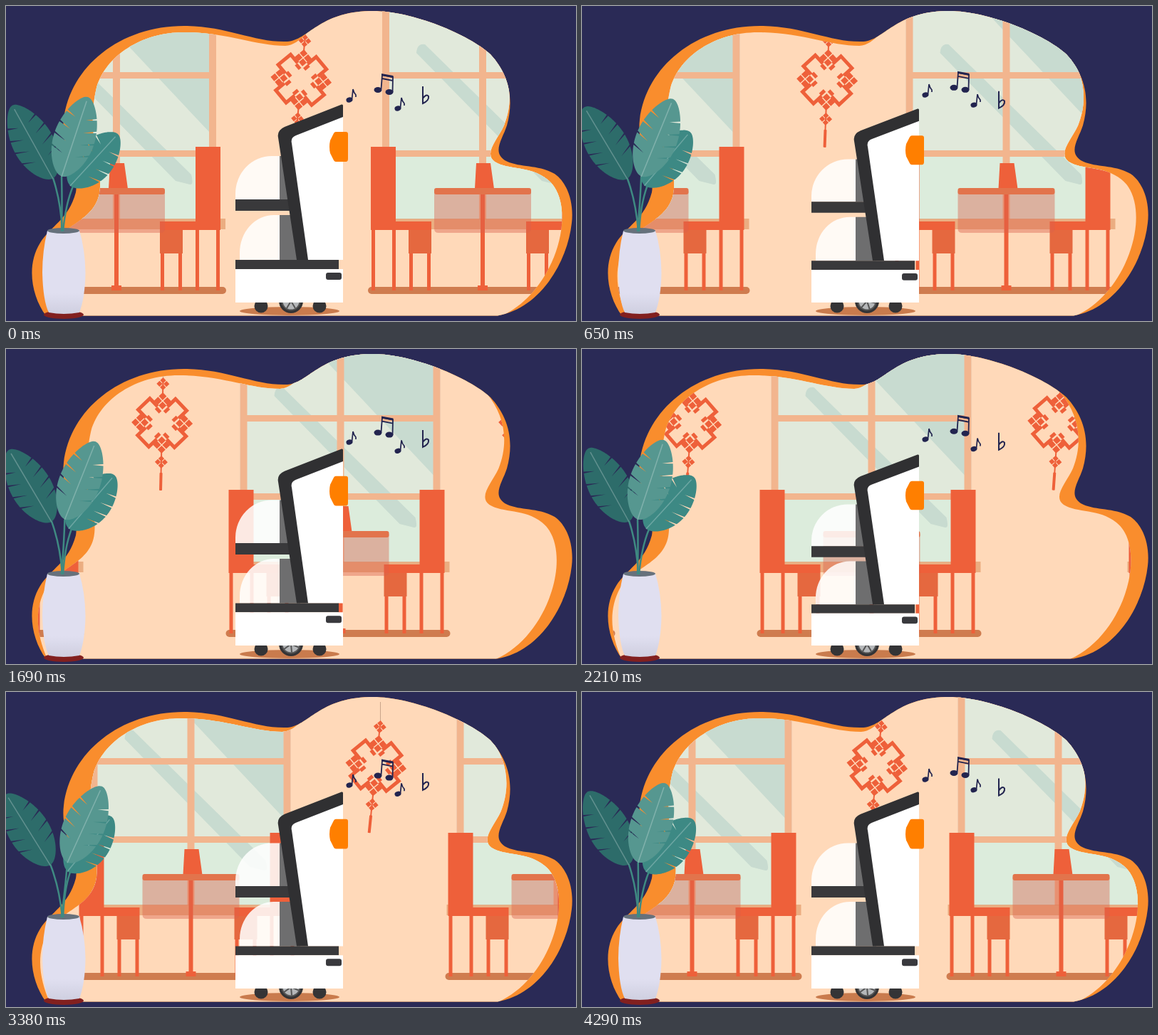
Animation of 800x443 px, one loop 4420 ms. Source, as an HTML page:

```html
<!DOCTYPE html>
<html lang="en">
<head>
<meta charset="utf-8">
<title>Serving robot</title>
<style>
  html, body { margin: 0; width: 100%; height: 100%; overflow: hidden; background: #2a2a56; }
  svg { display: block; width: 800px; height: 443px; }
</style>
</head>
<body>
<svg viewBox="0 0 800 443">
  <defs>
    <path id="outer" d="M56 435.500C36 408 28 365 48 333C62 310 88 300 98 262C103 235 76 200 81 160C90 85 160 28 250 28
      C310 28 350 52 395 50C425 48 440 7 515 7C570 7 650 40 680 68C702 92 715 125 703 168C697 187 682 205 700 217
      C720 228 745 222 770 236C790 250 797 280 794 305C788 360 750 425 690 435.500z"/>
    <clipPath id="outerClip"><use href="#outer"/></clipPath>
    <clipPath id="innerClip"><path id="inner" d="M66 437C52 405 45 370 64 335C85 305 130 300 132 255C134 215 112 180 127 115
      C140 70 190 37 250 37C310 37 350 56 392 56C425 55 440 -10 515 -8C580 -8 650 32 682 62C707 92 714 130 699 168
      C690 188 670 207 686 219C705 231 735 224 760 244C778 258 782 285 780 308C776 355 745 415 693 437z"/></clipPath>
    <linearGradient id="vase" x2="0" y2="1">
      <stop offset=".75" stop-color="#e0dff0"/><stop offset="1" stop-color="#cfcfe0"/>
    </linearGradient>

    <g id="window">
      <path fill="#e1e9db" d="M0 0H281V300H0z"/>
      <path fill="#dcecdc" d="M0 208H281V300H0z"/>
      <path fill="#c8dbd0" d="M105 0H272V178zM48 66Q49 52 60 54L246 237Q250 252 244 251L224 246z"/>
      <path fill="#f2b58e" d="M0 0h10v300h-10zM136 0h10v300h-10zM271 0h10v300h-10zM0 93h281v9H0zM0 203h281v9H0z"/>
      <path fill="#df935f" opacity=".62" d="M-14 299h308v15h-308z"/>
    </g>

    <g id="chair" fill="#ee603a">
      <path d="M0 198h35v105h50v12H0zM1 315h5v85h-5zM30 315h5v85h-5zM54 315h5v85h-5zM79 315h5v85h-5z"/>
      <path fill="#e5683f" d="M53 315h32v33h-32z"/>
    </g>
    <g id="furniture">
      <rect x="-4" y="395" width="315" height="10" rx="5" fill="#cf7c4f"/>
      <use href="#chair"/>
      <use href="#chair" transform="translate(303) scale(-1 1)"/>
      <path fill="#ee603a" d="M148 221h20l5 36h-27zM154 257h6v136h4v7h-14v-7h4z"/>
      <path fill="#d8604a" opacity=".42" d="M89 260H225V313Q225 319 219 319H95Q89 319 89 313z"/>
      <rect x="89" y="256" width="136" height="9" rx="3" fill="#e2744c"/>
    </g>

    <path id="knot" fill="#ee603a" d="M0 -12l5.5 5.5-5.5 5.5-5.5-5.5zM0 1l5.5 5.5-5.5 5.5-5.5-5.5zM-6.5 -5.5l5.5 5.5-5.5 5.5-5.5-5.5zM6.5 -5.5l5.5 5.5-5.5 5.5-5.5-5.5z"/>
    <g id="quarter">
      <use href="#knot" y="-31"/>
      <path d="M7 -23L18 -34L34 -18L23 -7M-9 -21L-3 -15M9 -21L3 -15" fill="none" stroke="#ee603a" stroke-width="5"/>
    </g>
    <g id="lantern">
      <path d="M0 0V22M0 102V134" stroke="#ee603a" stroke-width="2"/>
      <g transform="translate(0 62)">
        <use href="#quarter"/><use href="#quarter" transform="rotate(90)"/>
        <use href="#quarter" transform="rotate(180)"/><use href="#quarter" transform="rotate(270)"/>
      </g>
      <use href="#knot" transform="translate(0 7) scale(.75)"/>
      <use href="#knot" transform="translate(0 117) scale(.75)"/>
      <rect x="-2" y="132" width="4" height="25" rx="1" fill="#ee603a"/>
    </g>

    <g id="leaf">
      <path id="blade"/>
      <path d="M0 0V-112" stroke="#fff" stroke-opacity=".25" stroke-width="1.500"/>
    </g>
    <g id="note">
      <ellipse rx="4.600" ry="3.500" transform="rotate(-15)"/>
      <path d="M3.500 -1L5 -15Q6 -10 9 -7L9 -4" fill="none" stroke="#22244f" stroke-width="1.700"/>
    </g>
  </defs>

  <use href="#outer" fill="#f98d2d"/>
  <g clip-path="url(#outerClip)"><g clip-path="url(#innerClip)">
    <path fill="#ffd9b9" d="M0 0H800V443H0z"/>
    <g id="scenery">
      <use href="#window" x="14"/><use href="#window" x="528"/><use href="#window" x="1042"/>
      <use href="#furniture" x="-2"/><use href="#furniture" x="512"/><use href="#furniture" x="1030"/>
      <path d="M420 14V42M935 14V42" stroke="#c9a58a"/>
      <use class="lantern" href="#lantern" data-x="420"/>
      <use class="lantern" href="#lantern" data-x="935"/>
    </g>
  </g></g>

  <ellipse cx="398" cy="429" rx="70" ry="6" fill="#c97b4d"/>
  <g fill="#343436">
    <circle cx="358" cy="422" r="9.500"/><circle cx="440" cy="422" r="9.500"/>
    <circle cx="400" cy="415" r="17"/>
    <g id="wheel" stroke="#555" stroke-width="2"><circle r="12.500" fill="#b5b7b9"/><path d="M-12 0H12M-6 -10L6 10M6 -10L-6 10"/></g>
  </g>
  <g id="robot">
    <path fill="#fff" opacity=".86" d="M322 272V264A51 53 0 0 1 373 211H385V272zM328 357V347A48 53 0 0 1 376 294H385V357z"/>
    <path fill="#6e6e6f" d="M384 211H395L404 272H384zM384 294H402L413 357H384z"/>
    <path fill="#39393b" d="M322 272H400V288H322z"/>
    <path fill="#fff" d="M398 184L473 154V357H420z"/>
    <path fill="#303032" d="M471 138.500Q473 138 473 140V156L407 182Q399 185 401 193L424 357H408L382 185Q380 175 391 170z"/>
    <path fill="#ff7f00" d="M463 177H477Q480 177 480 180V215Q480 219 477 219H463Q461 219 460 217L455 207Q453 198 455 189L460 179Q461 177 463 177z"/>
    <path fill="#39393b" d="M322 357H467V370H322z"/>
    <path fill="#fff" d="M322 370H473V417H322z"/>
    <rect x="449" y="375" width="22" height="10" rx="3" fill="#39393d"/>
  </g>

  <g id="notes" fill="#22244f">
    <g data-rise="-10"><use href="#note" x="482" y="132"/></g>
    <g data-rise="-4.5">
      <ellipse cx="522" cy="118" rx="5.500" ry="4"/><ellipse cx="538" cy="121" rx="5.500" ry="4"/>
      <path d="M526.500 117L528 97L543 100L542.500 121M528 102L543 105" fill="none" stroke="#22244f" stroke-width="1.800"/>
      <path d="M527 95L543.500 98V101L527 98z"/>
    </g>
    <g data-rise="-7"><use href="#note" x="550" y="144"/></g>
    <g data-rise="9.5"><path d="M585 113V137Q594 133 593 127Q590 123 585 130" fill="none" stroke="#22244f" stroke-width="2"/></g>
  </g>

  <ellipse cx="81" cy="434" rx="28" ry="6" fill="#82201f"/>
  <path fill="url(#vase)" d="M58 316Q51 345 51 375Q52 415 60 431Q81 435 103 431Q111 410 111.500 375Q111 342 103 316z"/>
  <ellipse cx="80.500" cy="316" rx="22.500" ry="4" fill="#66717c"/>
  <g fill="none" stroke="#3f8a82" stroke-width="2.500">
    <g class="stalk" data-sway="-3.3"><path d="M66 242Q77 275 79 317"/><use href="#leaf" transform="translate(66 243) rotate(-29)" fill="#2d6c6a" stroke="none"/></g>
    <g class="stalk" data-sway="-4"><path d="M96 249Q84 275 80 317"/><use href="#leaf" transform="translate(90 253) rotate(42.500) scale(.98 .84)" fill="#3d8984" stroke="none"/></g>
    <g class="stalk" data-sway="7"><path d="M78 240Q79 275 78 317"/><use href="#leaf" transform="translate(78 240) rotate(18.300)" fill="#569790" stroke="none"/></g>
  </g>
</svg>
<script>
const $ = id => document.getElementById(id);
const place = (el, value) => el.setAttribute('transform', value);
const lanterns = document.querySelectorAll('.lantern');
const stalks = document.querySelectorAll('.stalk');

// Leaf outline: a rounded blade with evenly spaced slits on both sides
function bladePath() {
  const edge = side => Array.from({ length: 101 }, (_, i) => {
    const s = i / 100;
    const full = 29 * Math.sin(Math.PI * s ** .85) ** .6 || 0;
    const slit = s > .25 && s < .85 && i % 15 === 0;
    const width = slit ? full * .35 : full;
    return [side * width, -118 * s - (slit ? 0 : .25 * full) + .12 * full];
  });
  return 'M' + [...edge(-1), ...edge(1).reverse()].join('L') + 'z';
}
$('blade').setAttribute('d', bladePath());

// Triangle wave: 0 at the start of a period, 1 halfway
const triangle = (u, period) => 1 - Math.abs(1 - 2 * (u % period) / period);

function draw(time) {
  const step = Math.floor(time % 4420 / 130);
  const u = Math.floor(step * 1.5);
  const swing = 5.8 - 6.8 * Math.max(0, 1 - Math.abs(u - 14) / 15);
  place($('scenery'), `translate(${-10.5 * u})`);
  place($('inner'), `translate(${-10 * triangle(u, 50)})`);
  for (const el of lanterns) place(el, `translate(${el.dataset.x} 42) rotate(${swing})`);
  place($('robot'), `translate(0 417) scale(1 ${1 - .036 * triangle(u, 10)}) translate(0 -417)`);
  place($('wheel'), `translate(400 415) rotate(${u * 36})`);
  for (const note of $('notes').children) place(note, `translate(0 ${note.dataset.rise * triangle(u, 20)})`);
  for (const el of stalks) place(el, `rotate(${el.dataset.sway * triangle(u, 25)} 80 315)`);
}

const start = performance.now();
function loop() {
  draw(performance.now() - start);
  requestAnimationFrame(loop);
}
loop();
</script>
</body>
</html>
```
